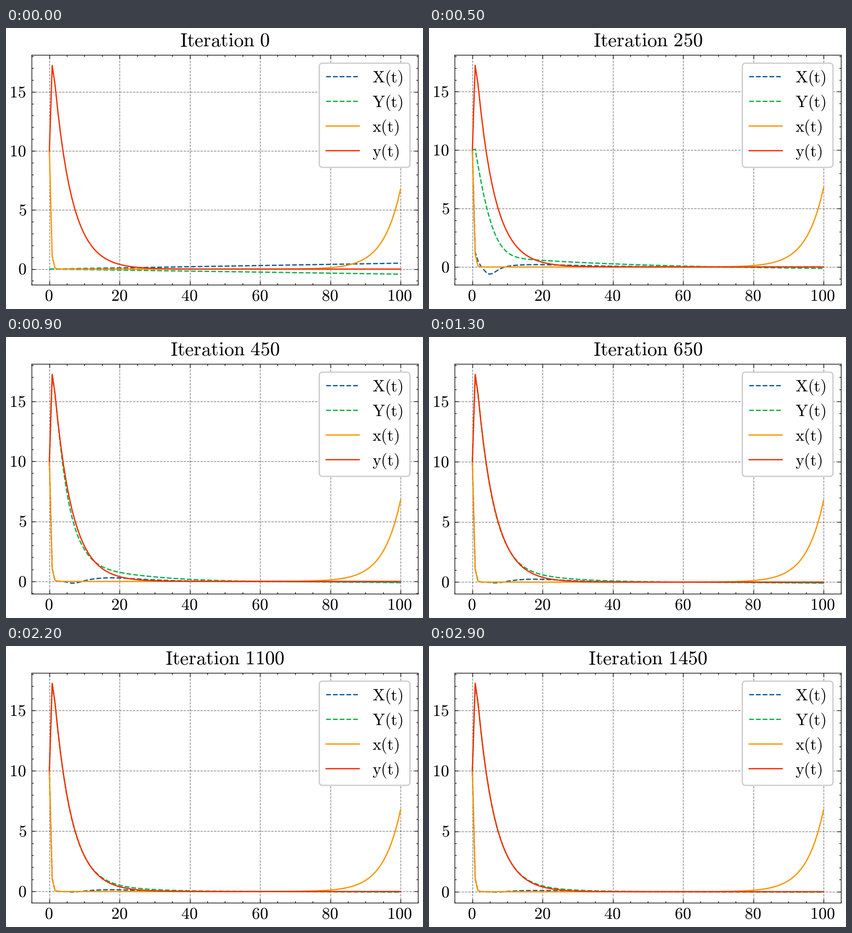
A matplotlib script that plays this animation: 911x615 px, repeating every 3 s.

```python
import numpy as np
import matplotlib.pyplot as plt
from matplotlib.animation import FuncAnimation
from matplotlib.patches import FancyBboxPatch
from matplotlib.ticker import MultipleLocator

plt.rcParams["mathtext.fontset"] = "cm"
plt.rcParams["text.hinting"] = "none"

W, H = 911, 615
LEFT, RIGHT, TOP, BOTTOM = 56.4, 900.4, 59, 561.6
FRAMES, INTERVAL, STEP = 30, 100, 50
BLUE, GREEN, ORANGE, RED = "#105B9C", "#0BB24A", "#FB9605", "#F63003"
LINE, THIN = 2.78, 1.39          # one point is one pixel at 72 dpi
LABEL, TITLE = 36, 42.7

t = np.linspace(0, 100, 126)


def predator_prey(rate=0.2, substeps=20):
    """Integrate x' = r x (1 - y), y' = r y (x - 1) from (10, 10) with RK4."""
    def slope(s):
        return rate * np.array([s[0] * (1 - s[1]), s[1] * (s[0] - 1)])

    h = (t[1] - t[0]) / substeps
    state = np.array([10.0, 10.0])
    rows = [state]
    for _ in t[1:]:
        for _ in range(substeps):
            a = slope(state)
            b = slope(state + h / 2 * a)
            c = slope(state + h / 2 * b)
            d = slope(state + h * c)
            state = state + h / 6 * (a + 2 * b + 2 * c + d)
        rows.append(state)
    return np.array(rows).T


def bump(center, width):
    """Bell curve of height 1 on a logarithmic time axis."""
    return np.exp(-(np.log(np.maximum(t, 1e-6) / center) / width) ** 2)


def residual(dip_x, rise_x, dip_y, rise_y, drift):
    """Error of the network: a dip, a later rise and a slow downward drift."""
    tail = drift * (t / 100) ** 3
    return np.array([
        rise_x * bump(17.5, 0.57) - dip_x * bump(7, 0.35) - 0.04 * tail,
        rise_y * bump(23, 0.6) - dip_y * bump(6, 0.65) - 0.09 * tail])


x, y = predator_prey()
early = t < 40
base = np.array([np.where(early, x, 0), y])      # the late rise is never learnt
x = np.where(early, x, 6.78 * np.exp(0.2 * (t - 100)))

# Network output (X, Y) at four stages of the training
start = np.array([0.005 * t, -0.0043 * t])
rough = np.array([
    base[0] + 0.5 * bump(1.3, 0.5) - 0.63 * bump(5, 0.45)
    + 0.2 * bump(18, 0.75),
    10.5 * np.exp(-0.17 * t - 0.014 * t ** 2)
    + 1.28 * np.exp(-t / 45) - 0.26])
rough[:, 0] = 10
closer = base + residual(0.17, 0.3, 0.65, 0.4, 1.2)
error = residual(0.08, 0.24, 0.1, 0.22, 1)


def network(it):
    if it < 250:
        k = (it / 250) ** 1.3
        return (1 - k) * start + k * rough
    if it < 450:
        k = 1 - (1 - (it - 250) / 200) ** 1.6
        return (1 - k) * rough + k * closer
    if it < 650:
        k = 1 - (1 - (it - 450) / 200) ** 1.5
        return (1 - k) * closer + k * (base + error)
    return base + error * np.exp((650 - it) / 900)


def roman(text):
    # Braces around "(" keep it from being kerned to the letter before
    return r"$\mathrm{" + text.replace(" ", r"\ ").replace("(", "{(}") + "}$"


fig = plt.figure(figsize=(W / 72, H / 72), dpi=72, facecolor="white")

ax = fig.add_axes([LEFT / W, 1 - BOTTOM / H,
                   (RIGHT - LEFT) / W, (BOTTOM - TOP) / H])
ax.set_xlim(-5, 105)
ax.xaxis.set_major_locator(MultipleLocator(20))
ax.xaxis.set_minor_locator(MultipleLocator(5))
ax.yaxis.set_major_locator(MultipleLocator(5))
ax.yaxis.set_minor_locator(MultipleLocator(1))
for which, size in (("major", 8.33), ("minor", 4.17)):
    ax.tick_params(which=which, direction="in", length=size, width=THIN,
                   top=True, right=True, labelleft=False, labelbottom=False)
ax.grid(True, color="black", alpha=0.5, linestyle="--", linewidth=THIN)
for spine in ax.spines.values():
    spine.set_linewidth(THIN)

SERIES = [("X(t)", BLUE, "--"), ("Y(t)", GREEN, "--"),
          ("x(t)", ORANGE, "-"), ("y(t)", RED, "-")]
lines = [ax.plot(t, 0 * t, color=c, ls=ls, lw=LINE)[0] for _, c, ls in SERIES]

# Pixel-space layer for all text and the legend
page = fig.add_axes([0, 0, 1, 1], zorder=5)
page.set_xlim(0, W)
page.set_ylim(H, 0)
page.axis("off")


def write(px, py, text, size=LABEL, ha="left"):
    return page.text(px, py, roman(text), fontsize=size, ha=ha, va="baseline")


def bearing(text):
    return 3 if text[0] == "1" else 1.5


title = write(478.3, 41, "Iteration 0", TITLE, "center")
for value in range(0, 101, 20):
    label = str(value)
    px = LEFT + (RIGHT - LEFT) * (value + 5) / 110
    write(px + 0.4 - bearing(label), 597, label, ha="center")
y_labels = {v: write(46.3 - bearing(str(v)), 0, str(v), ha="right")
            for v in range(0, 16, 5)}

page.add_patch(FancyBboxPatch(
    (684.5, 77), 198, 228, boxstyle="round,pad=0,rounding_size=7.2",
    facecolor="white", edgecolor="0.8", linewidth=LINE))
for row, (name, color, ls) in enumerate(SERIES):
    py = 105.8 + 54 * row
    page.plot([699, 771.3], [py, py], color=color, ls=ls, lw=LINE)
    write(800.5, py + 13.2, name)


def update(i):
    it = i * STEP
    title.set_text(roman(f"Iteration {it}"))
    curves = [*network(it), x, y]
    for line, curve in zip(lines, curves):
        line.set_ydata(curve)
    low, high = np.min(curves), np.max(curves)
    pad = 0.05 * (high - low)
    low, high = low - pad, high + pad
    ax.set_ylim(low, high)
    for value, label in y_labels.items():
        py = BOTTOM - (BOTTOM - TOP) * (value - low) / (high - low)
        label.set_y(py + 12)
    return [*lines, title, *y_labels.values()]


anim = FuncAnimation(fig, update, frames=FRAMES, interval=INTERVAL,
                     repeat=True, repeat_delay=0, blit=False)
plt.show()
```
